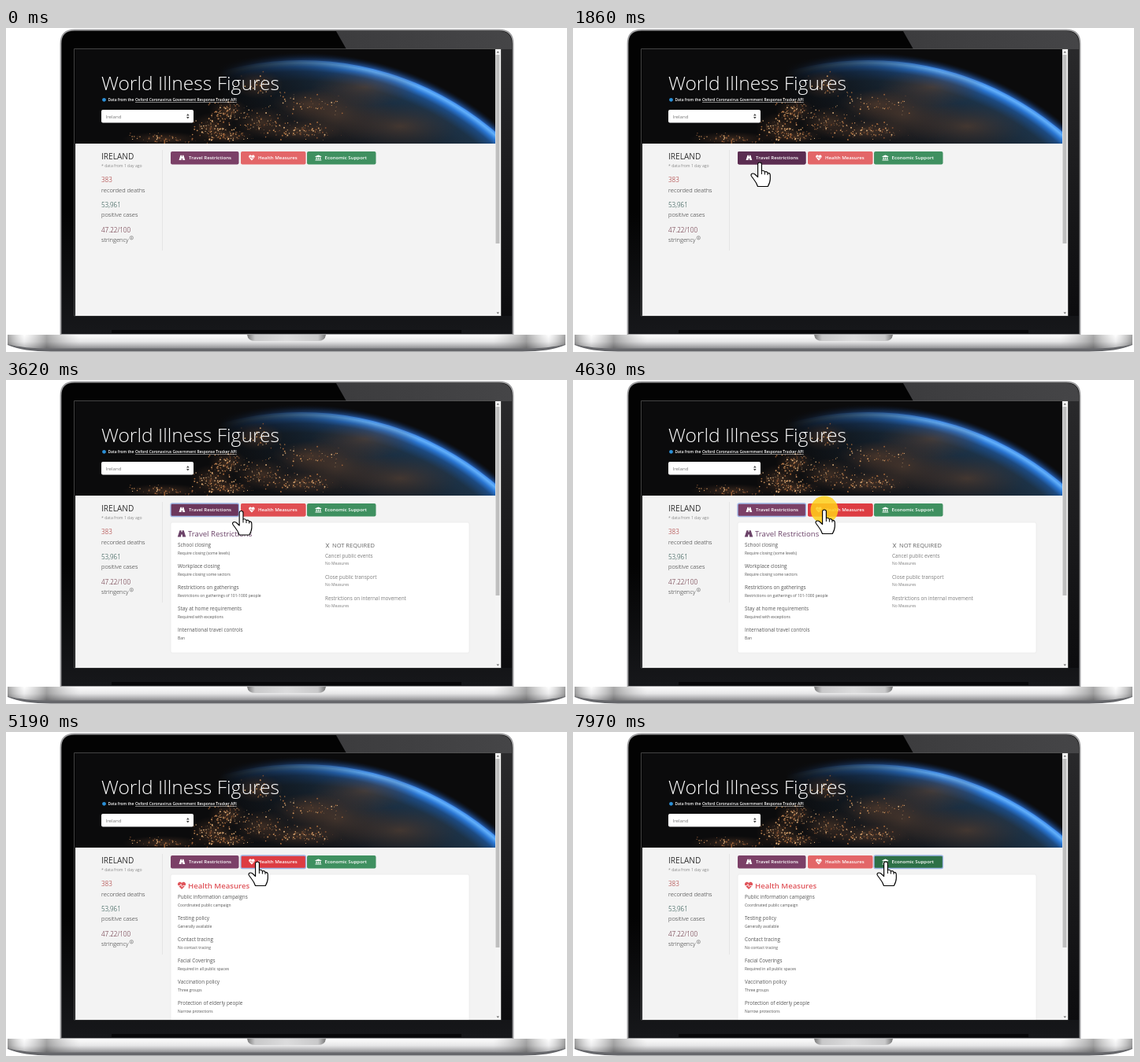
Write an HTML page that moves like this. It is 712 px wide and 412 px high and loops after 8000 ms.

```html
<!DOCTYPE html>
<html lang="en">
<head>
<meta charset="utf-8">
<title>World Illness Figures</title>
<style>
html, body { margin: 0; width: 100%; height: 100%; overflow: hidden; background: #fff; }
svg { display: block; width: 712px; height: 412px; }
text { font-family: "Open Sans", "Noto Sans", sans-serif; white-space: pre; }
</style>
</head>
<body>
<svg id="stage" viewBox="0 0 712 412">
  <defs>
    <linearGradient id="gloss" x1="0" x2="1" y1="0" y2="0">
      <stop offset="0" stop-color="#3c3c3e"/><stop offset="1" stop-color="#454547"/>
    </linearGradient>
    <linearGradient id="glossDown" x1="0" x2="0" y1="0" y2="1">
      <stop offset="0" stop-color="#29292b"/><stop offset="1" stop-color="#0c0c0e"/>
    </linearGradient>
    <linearGradient id="lid" x1="0" x2="0" y1="0" y2="1">
      <stop offset=".6" stop-color="#030303"/><stop offset="1" stop-color="#17181b"/>
    </linearGradient>
    <linearGradient id="metal" x1="0" x2="0" y1="0" y2="1">
      <stop offset="0" stop-color="#fff"/><stop offset=".5" stop-color="#e6e6e7"/><stop offset=".75" stop-color="#bdbdbf"/>
      <stop offset="1" stop-color="#8e8e91"/>
    </linearGradient>
    <linearGradient id="shade" x1="0" x2="1" y1="0" y2="0">
      <stop offset="0" stop-color="#444" stop-opacity=".5"/><stop offset=".03" stop-color="#fff" stop-opacity=".3"/>
      <stop offset=".07" stop-color="#444" stop-opacity=".45"/><stop offset=".13" stop-color="#999" stop-opacity="0"/>
      <stop offset=".87" stop-color="#999" stop-opacity="0"/><stop offset=".93" stop-color="#444" stop-opacity=".45"/>
      <stop offset=".97" stop-color="#fff" stop-opacity=".3"/><stop offset="1" stop-color="#444" stop-opacity=".5"/>
    </linearGradient>
    <linearGradient id="notch" x1="0" x2="1" y1="0" y2="0">
      <stop offset="0" stop-color="#777"/><stop offset=".1" stop-color="#c9c9ca"/><stop offset=".5" stop-color="#dcdcdd"/>
      <stop offset=".9" stop-color="#c9c9ca"/><stop offset="1" stop-color="#777"/>
    </linearGradient>
    <radialGradient id="planet" gradientUnits="userSpaceOnUse" cx="375" cy="419" r="378">
      <stop offset=".7" stop-color="#14161a"/><stop offset=".84" stop-color="#1a2632"/><stop offset=".93" stop-color="#1c3247"/>
      <stop offset=".962" stop-color="#1d4a80"/><stop offset=".978" stop-color="#2a76d2"/><stop offset=".991" stop-color="#62b0fb"/>
      <stop offset="1" stop-color="#3f8bea"/>
    </radialGradient>
    <radialGradient id="halo" gradientUnits="userSpaceOnUse" cx="375" cy="419" r="388">
      <stop offset=".973" stop-color="#2b74dc" stop-opacity=".8"/><stop offset="1" stop-color="#0a1a38" stop-opacity="0"/>
    </radialGradient>
    <linearGradient id="night" gradientUnits="userSpaceOnUse" x1="270" x2="470" y1="0" y2="0">
      <stop offset="0" stop-color="#0b0b0c"/><stop offset=".25" stop-color="#0b0b0c" stop-opacity=".75"/>
      <stop offset="1" stop-color="#0b0b0c" stop-opacity="0"/>
    </linearGradient>
    <radialGradient id="land">
      <stop offset="0" stop-color="#64442f" stop-opacity=".55"/><stop offset="1" stop-color="#4a3226" stop-opacity="0"/>
    </radialGradient>
    <clipPath id="screen"><path d="M88 27H621V366H88Z"/></clipPath>
    <clipPath id="hero"><path d="M88 27H621V147H88Z"/></clipPath>
  </defs>
</svg>
<script>
const stage = document.getElementById("stage");
const LOOP = 8000, STEP = 70;

const rect = (x, y, w, h, fill, more = "") =>
  `<rect x="${x}" y="${y}" width="${w}" height="${h}" fill="${fill}" ${more}/>`;
const path = (d, fill, more = "") => `<path d="${d}" fill="${fill}" ${more}/>`;
const text = (x, y, size, fill, str, weight = 400, more = "") =>
  `<text x="${x}" y="${y}" font-size="${size}" fill="${fill}" font-weight="${weight}" ${more}>${str}</text>`;

// Icons are drawn in a 10 by 9 box
const icons = {
  road: "M2.5 .5H4.5L4.4 2.6H5.6L5.5 .5H7.5L10 8.5H5.9L5.7 5.5H4.3L4.1 8.5H0Z",
  heart: "M5 9L.8 4.7C-1 2 1.5-1 4 .4L5 1.4 6 .4C8.5-1 11 2 9.2 4.7Z",
  bank: "M5 0L10 2.4V3.4H0V2.4ZM1.2 4H2.8V7.3H1.2ZM4.2 4H5.8V7.3H4.2ZM7.2 4H8.8V7.3H7.2ZM0 7.8H10V9.2H0Z"
};
const icon = (name, x, y, scale, fill, line) =>
  `<g transform="translate(${x} ${y}) scale(${scale})">${path(icons[name], fill)}` +
  (name == "heart" ? path("M0 4.6H3L4 2.8 5.3 6.2 6.3 4.6H10", "none", `stroke="${line}" stroke-width=".8"`) : "") + "</g>";

function laptop() {
  const base = "M2 390H710V402Q690 407.500 655 407.500H57Q22 407.500 2 402Z";
  return path("M69.500 390V20Q69.500 2.500 87 2.500H626Q643.500 2.500 643.500 20V390Z", "url(#lid)", 'stroke="#9c9c9e" stroke-width="1.800"') +
    path("M419 4H626Q642 4 642 20V27H432Z", "url(#gloss)") +
    path("M629 27H642V366H629Z", "url(#glossDown)") +
    path("M86.500 366V26.500H628.500V366Z", "none", 'stroke="#555" stroke-width=".8"') +
    rect(134, 384, 444, 4, "#08080a") +
    path("M2 390H710V403Q690 411.500 655 411.500H57Q22 411.500 2 403Z", "#66676b") +
    path(base, "url(#metal)") + path(base, "url(#shade)") +
    path("M306 390H406Q405 398 396 398H316Q307 398 306 390Z", "url(#notch)");
}

function hero() {
  let seed = 7;
  const rnd = () => (seed = seed * 16807 % 2147483647) / 2147483647;
  const spread = () => rnd() + rnd() + rnd() - 1.5;
  // cx, cy, half width, half height, number of lights
  const towns = [[282, 105, 20, 12, 110], [262, 128, 24, 16, 110], [200, 141, 42, 7, 60], [325, 120, 30, 16, 70],
    [385, 97, 40, 15, 60], [372, 132, 44, 11, 100], [320, 72, 26, 14, 30], [285, 138, 24, 7, 60]];
  const coasts = [[455, 75, 55, 18], [500, 125, 60, 22], [420, 110, 60, 30]];
  let s = rect(88, 27, 533, 120, "#0b0b0c") +
    '<circle cx="375" cy="419" r="388" fill="url(#halo)"/><circle cx="375" cy="419" r="378" fill="url(#planet)"/>' +
    rect(88, 27, 382, 120, "url(#night)");
  for (const [x, y, w, h] of [...towns, ...coasts])
    s += `<ellipse cx="${x}" cy="${y}" rx="${w * 1.25}" ry="${h * 1.3}" fill="url(#land)"/>`;
  for (const [x, y, w, h, n] of towns)
    for (let i = 0; i < n; i++) {
      const fill = ["#e6a466", "#b5723f", "#8a5433", "#f6c48c"][rnd() * 4 | 0];
      s += `<circle cx="${(x + spread() * w).toFixed(1)}" cy="${(y + spread() * h).toFixed(1)}" ` +
        `r="${(.3 + rnd() * .7).toFixed(2)}" fill="${fill}" opacity=".85"/>`;
    }
  return `<g clip-path="url(#hero)">${s}</g>` +
    text(121, 78.5, 24.6, "#fff", "World Illness Figures", 300) +
    '<circle cx="124.500" cy="91.300" r="2.400" fill="#2b8fd6"/>' +
    text(129.5, 93, 4.85, "#fff", "Data from the", 600) +
    text(164, 93, 4.9, "#fff", "Oxford Coronavirus Government Response Tracker API", 600, 'text-decoration="underline"') +
    rect(121, 104, 117, 16.5, "#fff", 'rx="2"') + text(126.5, 114.7, 6.1, "#777", "Ireland") +
    path("M229 111.500L230.800 109 232.600 111.500ZM229 113L230.800 115.500 232.600 113Z", "#444");
}

function sidebar() {
  const stat = (y, value, label, fill) =>
    text(121, y, 8.1, fill, value, 300) + text(121, y + 12.6, 7.5, "#222", label, 300);
  return text(121, 167.3, 10.1, "#333", "IRELAND") +
    text(121, 177, 5.1, "#8a8a8a", "* data from 1 day ago") +
    stat(196, "383", "recorded deaths", "#a01c1c") +
    stat(227.8, "53,961", "positive cases", "#123f38") +
    stat(259.6, "47.22/100", "stringency", "#561526") +
    '<circle cx="159.300" cy="266.800" r="2.200" fill="none" stroke="#555" stroke-width=".5"/>' +
    path("M159.300 265.500V268.200", "none", 'stroke="#555" stroke-width=".6"') +
    rect(198, 155, 1, 128, "#e5e5e5");
}

const buttons = [
  ["Travel Restrictions", "road", 209, 86.5, "#7b4067", "#5b2d51", 10.5, 23],
  ["Health Measures", "heart", 298, 82.5, "#e36668", "#dd3c42", 10, 22],
  ["Economic Support", "bank", 382, 87.5, "#3f9060", "#2d7047", 10.5, 22.5]
];
const button = ([label, sign, x, w, base, dark, iconX, labelX], i) =>
  rect(x, 157, w, 16.5, base, 'rx="2"') +
  rect(x, 157, w, 16.5, dark, `rx="2" id="hover${i}"`) +
  rect(x, 157, w, 16.5, "none", `rx="2" stroke="#9fb6e6" stroke-width="1.300" id="ring${i}"`) +
  icon(sign, x + iconX, 161.4, .78, "#fff", base) + text(x + labelX, 167.4, 6.1, "#fff", label, 600);

const list = (x, y, fill, items) => items.map(([title, note], i) =>
  text(x, y + i * 26.9, 6.4, fill, title) + text(x, y + 9.6 + i * 26.9, 4.95, fill, note)).join("");

function panel(i, height, sign, fill, weight, body) {
  return `<g id="panel${i}">` + rect(209, 181, 379, height, "#fff", 'rx="2" stroke="#e9e9e9" stroke-width=".7"') +
    icon(sign, 217.8, 190.6, 1.05, fill, "#fff") + text(231, 198.8, 9.6, fill, buttons[i][0], weight) + body + "</g>";
}

const travel = list(218, 212.4, "#555", [
    ["School closing", "Require closing (some levels)"], ["Workplace closing", "Require closing some sectors"],
    ["Restrictions on gatherings", "Restrictions on gatherings of 101-1000 people"],
    ["Stay at home requirements", "Required with exceptions"], ["International travel controls", "Ban"]]) +
  path("M406 207.700L410 213.200M410 207.700L406 213.200", "none", 'stroke="#666" stroke-width=".8"') +
  text(414, 213.2, 7.5, "#666", "NOT REQUIRED") +
  list(405, 225.8, "#7c7c7c", [["Cancel public events", "No Measures"], ["Close public transport", "No Measures"],
    ["Restrictions on internal movement", "No Measures"]]);
const health = list(218, 212.4, "#555", [
  ["Public information campaigns", "Coordinated public campaign"], ["Testing policy", "Generally available"],
  ["Contact tracing", "No contact tracing"], ["Facial Coverings", "Required in all public spaces"],
  ["Vaccination policy", "Three groups"], ["Protection of elderly people", "Narrow protections"]]);

const outline = 'stroke="#000" stroke-width="1.150" stroke-linejoin="round"';
const cursor = '<circle id="click" r="17.500" fill="#ffcf1a" opacity=".85"/><g id="cursor">' +
  path("M0 0V24L5.500 19 9.500 28 13.500 26.300 9.600 17.600H17Z", "#fff", `id="arrow" ${outline}`) +
  '<g id="hand">' +
  path("M-2.400 2.300Q-2.400 0 0 0 2.400 0 2.400 2.300V10.500Q5 9.600 6.400 12 9 11 10 13.400 13.300 13 13.300 16.500V21" +
    "Q13.300 25 10.300 30.500H-2.500Q-4 26-7.500 21.500L-10.500 17.500Q-11.800 15.500-9.800 14.300-7.500 13.300-5 16L-2.400 18.500Z", "#fff", outline) +
  path("M2.400 10.500V15M6.400 12V15.500M10 13.400V16", "none", 'stroke="#000"') + "</g></g>";

stage.insertAdjacentHTML("beforeend", laptop() + rect(88, 27, 540, 339, "#f3f3f3") + hero() +
  '<g clip-path="url(#screen)">' + sidebar() + buttons.map(button).join("") +
  panel(0, 166, "road", "#6b4268", 400, travel) + panel(1, 210, "heart", "#e0545a", 600, health) + "</g>" +
  rect(621, 27, 7, 339, "#f4f4f4") + rect(621.5, 34, 5, 240, "#bfbfbf") +
  path("M622.500 31.500L624.300 29.500 626 31.500ZM622.500 361.500L624.300 363.500 626 361.500Z", "#666") + cursor);

const el = id => document.getElementById(id);
const ramp = (t, a, b) => Math.min(1, Math.max(0, (t - a) / (b - a)));
const set = (id, opacity) => el(id).setAttribute("opacity", opacity);
const show = (id, on) => el(id).setAttribute("display", on ? "inline" : "none");
const within = (t, a, b) => t >= a && t < b;

// start, end, from, to
const moves = [
  [530, 1450, [251, 414], [237, 171]],
  [2930, 3820, [237, 171], [319, 165]],
  [5910, 6820, [319, 165], [397, 165]]
];
const clicks = [2190, 4630, 7830];

function pointer(t) {
  const [a, b, from, to] = moves.findLast(m => t >= m[0]) || moves[0];
  const u = ramp(a + Math.floor((t - a) / STEP) * STEP, a, b);
  const e = u * .5 + u * u * (3 - 2 * u) * .5;
  return from.map((v, i) => v + (to[i] - v) * e);
}

function draw(t) {
  const [x, y] = pointer(t);
  for (const id of ["cursor", "click"]) el(id).setAttribute("transform", `translate(${x} ${y})`);
  show("cursor", t >= 600);
  show("arrow", t < 1450);
  show("hand", t >= 1450);
  show("click", clicks.some(c => within(t, c, c + 140)));
  set("hover0", ramp(t, 1400, 1600) - ramp(t, 3530, 3700));
  set("hover1", ramp(t, 3530, 3700) - ramp(t, 6600, 6780));
  set("hover2", ramp(t, 6680, 6900));
  show("ring0", within(t, 2330, 4770));
  show("ring1", within(t, 4770, 7900));
  show("ring2", t >= 7900);
  set("panel0", ramp(t, 2260, 2530) - ramp(t, 4700, 4900));
  set("panel1", ramp(t, 4840, 5190));
}

function frame() {
  draw(performance.now() % LOOP);
  requestAnimationFrame(frame);
}
frame();
</script>
</body>
</html>
```
